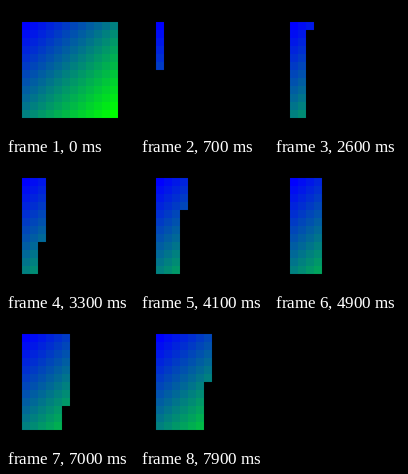
Recreate the animation shown at these times as an HTML page with a canvas. Size 160 px wide and 160 px high, loop 8 s.

```html
<!DOCTYPE html>
<html lang="en">
<head>
<meta charset="utf-8">
<title>Grid fill</title>
<style>
  html, body { margin: 0; width: 100%; height: 100%; overflow: hidden; background: #000; }
  canvas { display: block; width: 160px; height: 160px; }
</style>
</head>
<body>
<canvas id="stage" width="160" height="160"></canvas>
<script>
  const ctx = document.getElementById('stage').getContext('2d');
  const SIZE = 12, CELL = 10, MARGIN = 20;
  const STEP = 100, LOOP = 8000;

  // Blue at the top left, green at the bottom right.
  function cellColor(col, row) {
    const g = Math.round(255 * (col + row) / (2 * SIZE - 2));
    return `rgb(0, ${g}, ${255 - g})`;
  }

  // Cells fill column by column, each from top to bottom.
  function draw(count) {
    ctx.fillStyle = '#000';
    ctx.fillRect(0, 0, 160, 160);
    for (let i = 0; i < count; i++) {
      const col = Math.floor(i / SIZE), row = i % SIZE;
      ctx.fillStyle = cellColor(col, row);
      ctx.fillRect(MARGIN + col * CELL, MARGIN + row * CELL, CELL, CELL);
    }
  }

  function tick() {
    const step = Math.floor((performance.now() - start) % LOOP / STEP);
    draw(step === 0 ? SIZE * SIZE : step - 1);
    requestAnimationFrame(tick);
  }

  const start = performance.now();
  tick();
</script>
</body>
</html>
```
